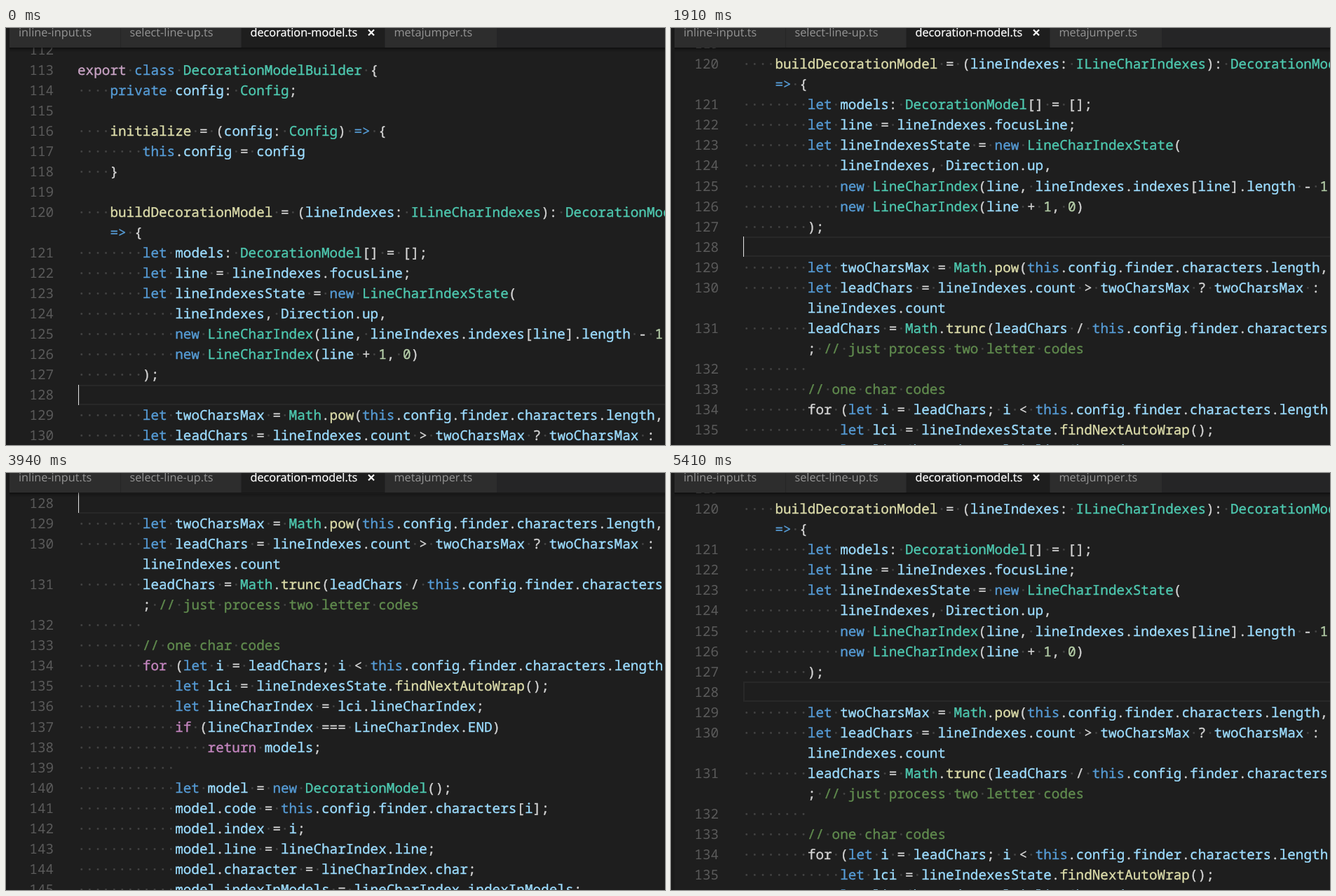
These frames come from a looping animation (940x596 px, 5500 ms). An HTML page:

```html
<!DOCTYPE html>
<html lang="en">
<head>
<meta charset="utf-8">
<title>Code editor scrolling</title>
<style>
  html, body { margin: 0; width: 100%; height: 100%; overflow: hidden; background: #1e1e1e; }
  #stage { position: relative; width: 940px; height: 596px; overflow: hidden; text-rendering: geometricPrecision; }
  #stage div { position: absolute; box-sizing: border-box; }

  #tabs { left: 0; top: 0; width: 940px; height: 28px; background: #252526;
    font: 16.25px/20px "Open Sans", "Noto Sans", sans-serif; color: #949494; white-space: pre; }
  #tabs div { top: 0; height: 28px; background: #2d2d2d; }
  #tabs span { position: absolute; top: -4px; }
  #tabs .active { background: #1e1e1e; color: #fff; -webkit-text-stroke: 0.25px; }
  #tabs svg { position: absolute; left: 180px; top: 1px; }

  #editor { left: 0; top: 28px; width: 940px; height: 568px; overflow: hidden; }
  #shade { left: 0; top: 28px; width: 940px; height: 6px; box-shadow: #000 0 6px 6px -6px inset; }
  #edge { left: 0; top: 0; width: 5px; height: 596px; background: #1a1a1a; }

  #view { left: 0; width: 940px; height: 1100px; animation: scroll 5.5s step-end infinite; }
  #current { left: 103px; top: 493.85px; width: 860px; height: 29.05px; border: 2px solid #282828; }
  #cursor { left: 103px; top: 493.85px; width: 1px; height: 29.05px; background: #e0e0e0;
    animation: blink 5.5s step-end infinite; }
  .row { left: 0; height: 29.05px; white-space: pre; color: #d4d4d4;
    font: 19.33px/29.05px "Noto Sans Mono", "DejaVu Sans Mono", monospace; }
  .row b { position: absolute; left: 33.3px; font-weight: 400; color: #5a5a5a; }
  .row code { position: absolute; left: 102px; font: inherit; -webkit-text-stroke: 0.35px; }
  .dot { color: #444; }
  .comment { color: #608b4e; }
  .control { animation: tint 5.5s step-end infinite; }
  .keyword { color: #569cd6; }
  .type { color: #4ec9b0; }
  .fn { color: #dcdcaa; }
  .num { color: #b5cea8; }
  .name { color: #9cdcfe; }

  @keyframes scroll {
    0% { top: -12px; }
    24.909% { top: -223.7px; }
    53.09% { top: -493.4px; }
    74.181%, 100% { top: -223.7px; }
  }
  @keyframes blink {
    0%, 16.363%, 34.727%, 54.545%, 71.636%, 90% { opacity: 1; }
    8%, 26.181%, 44.545%, 63.09%, 80.181%, 98.363%, 100% { opacity: 0; }
  }
  @keyframes tint {
    0% { color: #c8a3c4; }
    24.909%, 74.181%, 100% { color: #d4d4d4; }
    53.09% { color: #c586c0; }
  }
</style>
</head>
<body>
<div id="stage">
  <div id="editor">
    <div id="view">
      <div id="current"></div>
      <div id="cursor"></div>
    </div>
  </div>
  <div id="shade"></div>
  <div id="tabs">
    <div style="left:5px;width:158px"><span style="left:13px">inline-input.ts</span></div>
    <div style="left:164px;width:171px"><span style="left:12.5px">select-line-up.ts</span></div>
    <div class="active" style="left:336px;width:204px"><span style="left:12.5px">decoration-model.ts</span>
      <svg width="10" height="11"><path d="M1 1.5L9 9.5M9 1.5L1 9.5" stroke="#fff" stroke-width="2.2"/></svg></div>
    <div style="left:541px;width:159px"><span style="left:12.5px">metajumper.ts</span></div>
  </div>
  <div id="edge"></div>
</div>
<script>
const PITCH = 29.05, FIRST = 112;

// A leading "|" marks a soft-wrapped row: no number, indent without dots.
const source = `
export class DecorationModelBuilder {
    private config: Config;

    initialize = (config: Config) => {
        this.config = config
    }

    buildDecorationModel = (lineIndexes: ILineCharIndexes): DecorationModel[]
|    => {
        let models: DecorationModel[] = [];
        let line = lineIndexes.focusLine;
        let lineIndexesState = new LineCharIndexState(
            lineIndexes, Direction.up,
            new LineCharIndex(line, lineIndexes.indexes[line].length - 1
            new LineCharIndex(line + 1, 0)
        );

        let twoCharsMax = Math.pow(this.config.finder.characters.length,
        let leadChars = lineIndexes.count > twoCharsMax ? twoCharsMax :
|        lineIndexes.count
        leadChars = Math.trunc(leadChars / this.config.finder.characters
|        ; // just process two letter codes
${' '.repeat(8)}
        // one char codes
        for (let i = leadChars; i < this.config.finder.characters.length;
            let lci = lineIndexesState.findNextAutoWrap();
            let lineCharIndex = lci.lineCharIndex;
            if (lineCharIndex === LineCharIndex.END)
                return models;
${' '.repeat(12)}
            let model = new DecorationModel();
            model.code = this.config.finder.characters[i];
            model.index = i;
            model.line = lineCharIndex.line;
            model.character = lineCharIndex.char;
            model.indexInModels = lineCharIndex.indexInModels;`;

const rules = [
  ['comment', '\\/\\/.*'],
  ['control', '\\b(?:export|for|if|return)\\b'],
  ['keyword', '\\b(?:class|private|let|new|this)\\b|=>'],
  ['type', '\\bMath\\b|(?<=(?:class|new|:) )[A-Z]\\w*'],
  ['fn', '\\b[a-z]\\w*(?=\\(| = \\()'],
  ['num', '\\b\\d+'],
  ['name', '\\b[A-Za-z]\\w*'],
  ['', '[^\\w\\s]'],
  ['dot', ' +']
];
const lexer = new RegExp(rules.map(r => `(${r[1]})`).join('|'), 'g');

function span(parent, cls, text) {
  const el = document.createElement('span');
  el.className = cls;
  el.textContent = text;
  parent.append(el);
}

// Splits a token at its spaces so that each space shows as a dot.
function addToken(code, cls, text) {
  for (const part of text.match(/ +|[^ ]+/g)) {
    if (part[0] === ' ') span(code, 'dot', '·'.repeat(part.length));
    else span(code, cls, part);
  }
}

const view = document.getElementById('view');
let number = FIRST;
source.split('\n').forEach((line, i) => {
  const row = document.createElement('div');
  const code = document.createElement('code');
  row.className = 'row';
  row.style.top = i * PITCH - 0.5 + 'px';
  if (line[0] === '|') {
    const text = line.slice(1);
    line = text.trimStart();
    code.append(' '.repeat(text.length - line.length));
  } else {
    const label = document.createElement('b');
    label.textContent = number++;
    row.append(label);
  }
  for (const m of line.matchAll(lexer)) {
    const k = rules.findIndex((r, j) => m[j + 1] !== undefined);
    addToken(code, rules[k][0], m[0]);
  }
  row.append(code);
  view.append(row);
});
</script>
</body>
</html>
```
